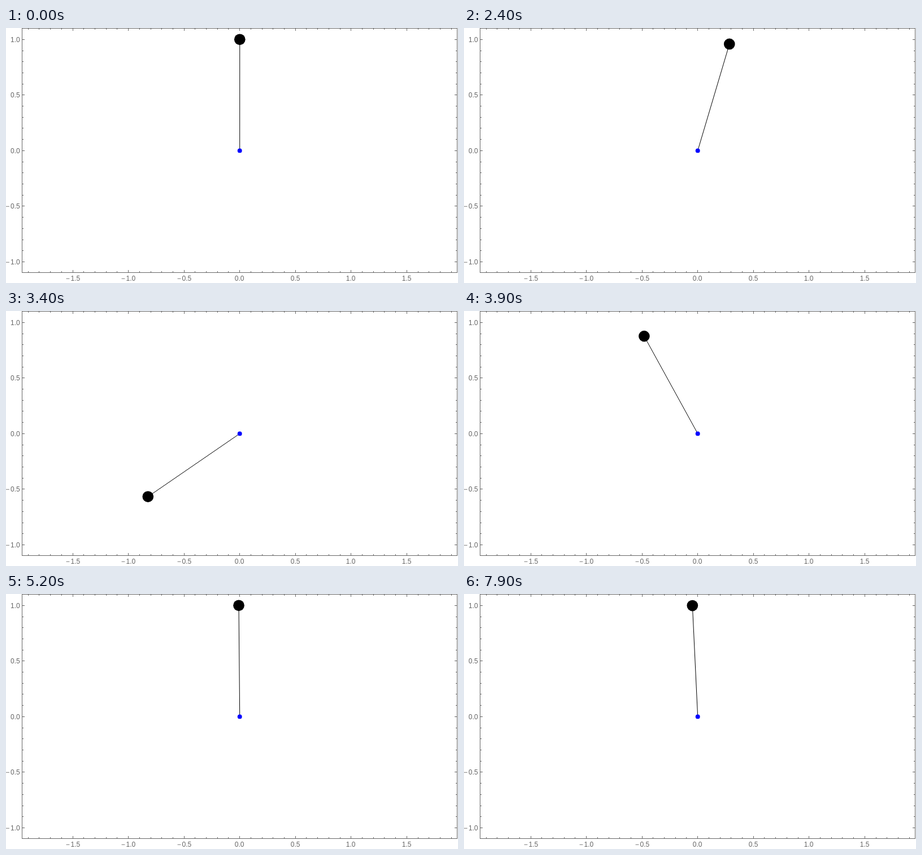
An HTML page with a canvas that plays this animation: 800x452 px, repeating every 8000 ms.

```html
<!DOCTYPE html>
<html lang="en">
<head>
<meta charset="utf-8">
<title>Inverted pendulum</title>
<style>
  html, body { margin: 0; width: 100%; height: 100%; overflow: hidden; background: #fff; }
  canvas { display: block; }
</style>
</head>
<body>
<canvas id="stage" width="800" height="452"></canvas>
<script>
const ctx = document.getElementById('stage').getContext('2d');
const UNIT = 197.1, CX = 413.7, CY = 217.4;
const LEFT = 28.5, RIGHT = 798.5, TOP = 0.5, BOTTOM = 433.5;
const LOOP = 8000, STEP = 100;
const GREY = '#666';

function line(x1, y1, x2, y2) {
  ctx.beginPath();
  ctx.moveTo(x1, y1);
  ctx.lineTo(x2, y2);
  ctx.stroke();
}

function disk(x, y, radius, color) {
  ctx.fillStyle = color;
  ctx.beginPath();
  ctx.arc(x, y, radius, 0, 2 * Math.PI);
  ctx.fill();
}

// The minus sign stands slightly apart from the digits.
function label(value, right, baseline) {
  const digits = Math.abs(value).toFixed(1);
  const start = right - ctx.measureText(digits).width;
  ctx.fillText(digits, start, baseline);
  if (value < 0) ctx.fillText('−', start - 8.8, baseline);
}

const snap = v => Math.floor(v) + 0.5;

function drawAxes() {
  ctx.strokeStyle = ctx.fillStyle = GREY;
  ctx.lineWidth = 1;
  ctx.font = '12px "Liberation Sans", Arial, sans-serif';
  ctx.strokeRect(LEFT, TOP, RIGHT - LEFT, BOTTOM - TOP);

  for (let i = -19; i <= 19; i++) {
    const x = snap(CX + i * UNIT / 10), major = i % 5 === 0;
    const size = major ? 4.5 : 2.5;
    line(x, TOP, x, TOP + size);
    line(x, BOTTOM, x, BOTTOM - size);
    if (major) label(i / 10, x + (i < 0 ? 12.7 : 8), 448);
  }
  for (let i = -10; i <= 10; i++) {
    const y = snap(CY - i * UNIT / 10), major = i % 5 === 0;
    const size = major ? 4.5 : 2.5;
    line(LEFT, y, LEFT + size, y);
    line(RIGHT, y, RIGHT - size, y);
    if (major) label(i / 10, 24.7, y + 4.5);
  }
}

// Near-separatrix swing: released almost upright, one full turn, then a slow tip back.
function angleAt(t) {
  const k = Math.sqrt(9.81), release = Math.PI / 10000, bottomTime = 3.239;
  const swing = 4 * Math.atan(Math.exp(k * (t - bottomTime)));
  const settle = release / 2 * Math.exp(-k * t);
  const tipBack = 0.000295 * Math.exp(k * (t - 6.277));
  return swing + settle - tipBack;
}

function draw(now) {
  const t = Math.floor(now % LOOP / STEP) * STEP / 1000;
  const angle = angleAt(t);
  const x = CX + UNIT * Math.sin(angle), y = CY - UNIT * Math.cos(angle);

  ctx.fillStyle = '#fff';
  ctx.fillRect(0, 0, 800, 452);
  drawAxes();
  ctx.strokeStyle = '#000';
  line(CX, CY, x, y);
  disk(x, y, 9.86, '#000');
  disk(CX, CY, 3.95, '#00f');
}

let start;
function tick(now) {
  start ??= now;
  draw(now - start);
  requestAnimationFrame(tick);
}
draw(0);
requestAnimationFrame(tick);
</script>
</body>
</html>
```
